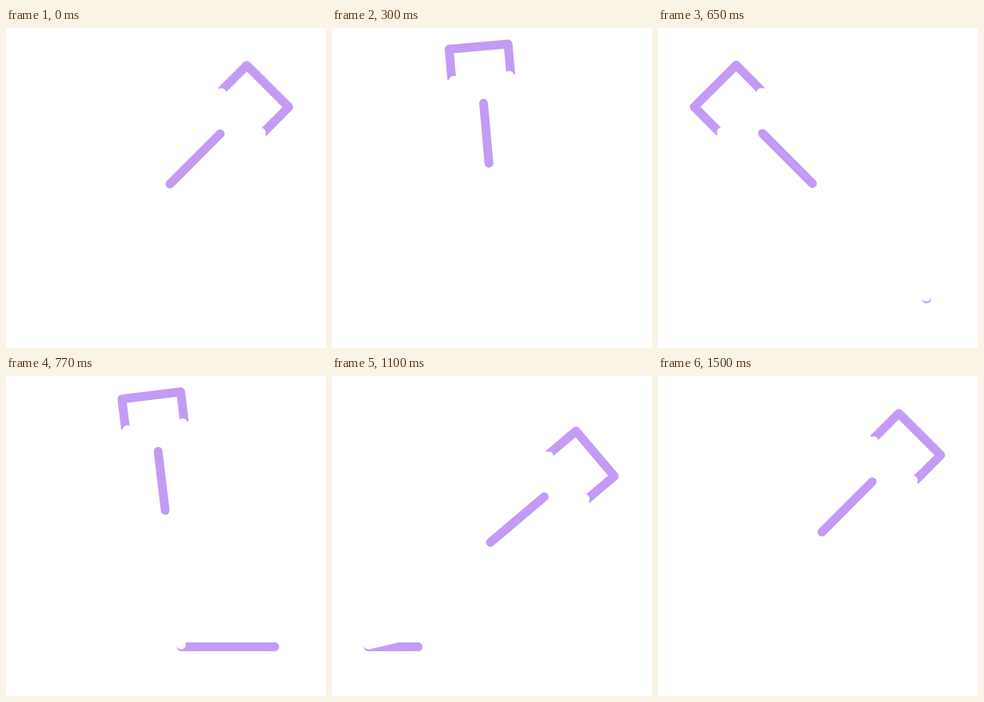
Write an HTML page that moves like this. It is 400x400 px and loops after 1.52 s.

```html
<!DOCTYPE html>
<html lang="en">
<head>
<meta charset="utf-8">
<title>Swing and sweep</title>
<style>
html, body { margin: 0; width: 100%; height: 100%; overflow: hidden; background: #fff; }
svg { display: block; width: 100%; height: 100%; }
path { fill: none; stroke: #c49bf4; stroke-width: 11; stroke-linejoin: round; }
.round { stroke-linecap: round; }
.cover { stroke: #fff; }
circle { fill: #fff; }
</style>
</head>
<body>
<svg viewBox="0 0 400 400">
  <g id="floor">
    <path id="line" class="round"/>
    <path id="cover" class="round cover"/>
  </g>
  <g id="tool">
    <path id="shaft" class="round"/>
    <path id="head"/>
    <circle id="capL" r="5.8"/>
    <circle id="capR" r="5.8"/>
  </g>
</svg>
<script>
const LOOP = 1520;
const el = id => document.getElementById(id);
const set = (id, attrs) => {
  for (const k in attrs) el(id).setAttribute(k, attrs[k]);
};
const clamp = v => Math.min(1, Math.max(0, v));
const span = (t, a, b) => clamp((t - a) / (b - a));
const smooth = s => s * s * (3 - 2 * s);

// cubic-bezier(x1, 0, x2, 1)
function ease(u, x1, x2) {
  let lo = 0, hi = 1;
  for (let i = 0; i < 30; i++) {
    const s = (lo + hi) / 2, r = 1 - s;
    const x = 3 * r * r * s * x1 + 3 * r * s * s * x2 + s * s * s;
    if (x < u) lo = s; else hi = s;
  }
  return u <= 0 ? 0 : u >= 1 ? 1 : smooth(lo);
}

// Monotone curve through [time, value] pairs, flat at both ends
function track(keys) {
  const slope = i => (keys[i + 1][1] - keys[i][1]) / (keys[i + 1][0] - keys[i][0]);
  const tangents = keys.map((k, i) => {
    if (i === 0 || i === keys.length - 1) return 0;
    const a = slope(i - 1), b = slope(i);
    return a * b > 0 ? 2 * a * b / (a + b) : 0;
  });
  return t => {
    let i = 0;
    while (i < keys.length - 2 && t > keys[i + 1][0]) i++;
    const [t0, v0] = keys[i], [t1, v1] = keys[i + 1];
    const s = span(t, t0, t1), r = 1 - s;
    return v0 + (v1 - v0) * smooth(s)
      + (t1 - t0) * s * r * (r * tangents[i] - s * tangents[i + 1]);
  };
}

const baseX = track([[0, 205], [200, 199], [400, 194], [500, 193], [640, 193],
  [770, 199], [850, 201], [950, 201], [1100, 198], [1200, 198], [1500, 205]]);
const baseY = track([[0, 195], [200, 177], [290, 169], [350, 171], [400, 178], [500, 195],
  [640, 195], [770, 168], [830, 171.5], [950, 189], [1100, 208], [1170, 210],
  [1200, 210], [1500, 195]]);
const reach = track([[0, 172.8], [200, 149], [275, 145], [350, 153.5], [400, 164.5],
  [500, 172.8], [640, 172.8], [770, 144.8], [830, 152.5], [950, 169.2],
  [1100, 171.7], [1170, 172.8]]);
const lineEnd = track([[770, 336], [800, 333], [950, 229], [1100, 108.5], [1175, 52]]);

function draw(t) {
  const swing = ease(span(t, 0, 500), 0.508, 0.677);
  const sweep = ease(span(t, 640, 1170), 0.39, 0.01);
  const back = smooth(span(t, 1200, 1500));
  const angle = 45 - 90 * swing + 95.3 * sweep - 5.3 * back;
  const x = baseX(t), y = baseY(t), len = reach(t);

  set('tool', { transform: `translate(${x} ${y}) rotate(${angle})` });
  set('shaft', { d: `M0 0V${-0.514 * len}` });
  const low = -0.738 * len;
  set('head', { d: `M-37 ${low}V${-len}H37V${low}` });
  set('capL', { cx: -35, cy: -0.73 * len });
  set('capR', { cx: 35, cy: -0.73 * len });

  const tip = 336 - 292.4 * sweep;
  set('floor', { visibility: t > 645 && t < 1200 ? 'visible' : 'hidden' });
  set('line', { d: `M${tip} 338.5H${Math.max(tip, lineEnd(t))}` });
  set('cover', { d: `M${tip} 336.3L${x + 25} ${y + 85.5}` });
}

const start = performance.now();
function tick() {
  draw((performance.now() - start) % LOOP);
  requestAnimationFrame(tick);
}
tick();
</script>
</body>
</html>
```
